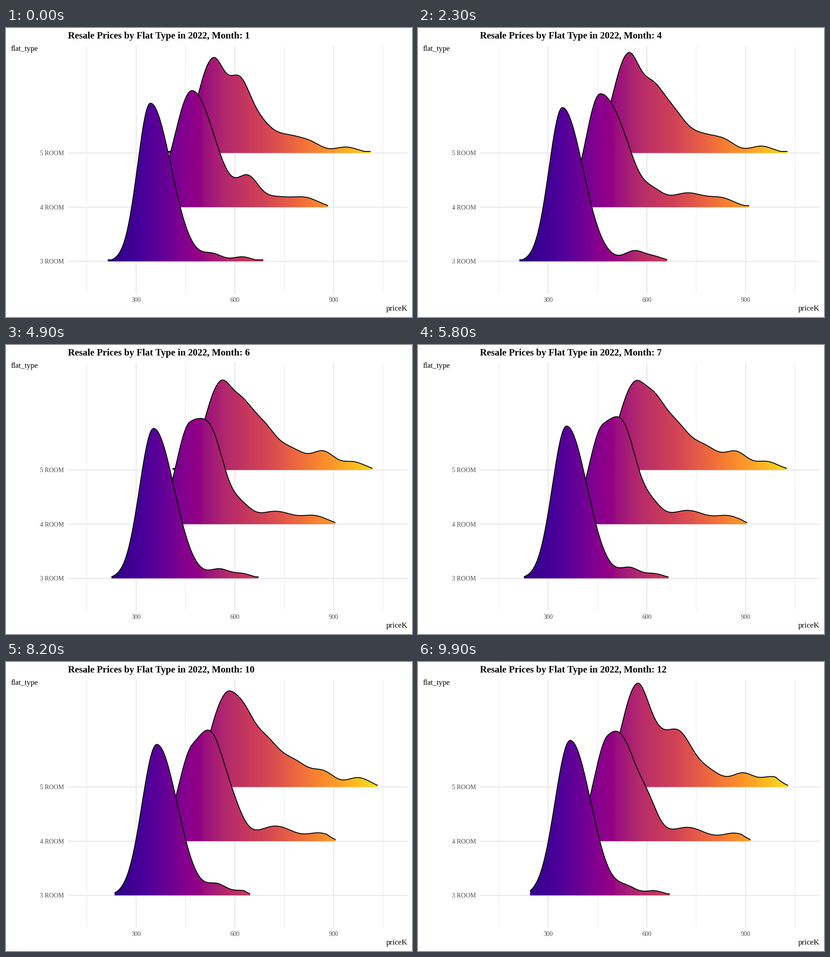
Recreate the animation shown at these times as a matplotlib script. Size 885 px wide and 632 px high, loop 10 s.

```python
import numpy as np
import matplotlib.pyplot as plt
from matplotlib.animation import FuncAnimation
from matplotlib.colors import LinearSegmentedColormap
from matplotlib.path import Path

W, H, DPI = 885, 632, 100
FRAMES, INTERVAL = 100, 100
LEFT, RIGHT, TOP, BOTTOM = 135, 875.5, 38.5, 581
CUT = 3.5                        # ridges end at this height
SHIFT = 0.8

plt.rcParams["font.family"] = "Liberation Serif"


def at(v, f):
    """Value at frame f; a tuple is spread evenly over the year."""
    v = np.atleast_1d(v)
    return np.interp(f, np.linspace(0, FRAMES - 1, len(v)), v)


def bump(x, center, height, left, right):
    d = x - center
    return height * np.exp(-0.5 * (d / np.where(d < 0, left, right)) ** 2)


class Ridge:
    """A density made of bumps: (center, height, left width, right width)."""

    def __init__(self, name, base, start, end, bumps):
        self.name, self.base = name, base
        self.start, self.end, self.bumps = start, end, bumps

    def curve(self, f):
        lo, hi = at(self.start, f), at(self.end, f)
        x = np.linspace(lo, hi, 500)
        h = sum(bump(x, *(at(v, f) for v in b)) for b in self.bumps)
        d = hi - x
        h = np.clip(h, CUT, CUT + 0.4 * d + 0.01 * d ** 2)
        return x + SHIFT, self.base - h


RIDGES = [
    Ridge("3 ROOM", 510.4,
          (221, 214, 229.5, 229, 231, 236, 243.5),
          (560, 545, 538, 550, 541, 531, 548),
          [((314, 312, 317, 321, 325, 328, 331),
            (346, 343, 326, 328, 338, 330, 339), (28, 33), 44.5),
           ((450, 470, 472, 465, 458, 460, 455), (15, 23, 21, 19, 24, 22, 16), 21, 21),
           (514, 10, 20, 20)]),
    Ridge("4 ROOM", 391.9,
          320,
          (701, 722, 720, 717, 716, 718, 724),
          [((404.5, 391, 403, 400, 403, 405, 412),
            (255, 257, 229, 215, 200, 195, 215),
            (38, 28.5, 34, 30, 30, 30, 30), 49),
           (453, (0, 22, 34, 80, 102, 103, 60), 25, 25),
           ((527, 515, 507, 512, 505, 495, 500), (53, 12, 42, 28, 33, 45, 55), 22, 22),
           (587, (22, 31, 31, 28, 32, 33, 30), 38, 38),
           ((655, 690), 17, 27, 27)]),
    Ridge("5 ROOM", 273.4,
          (352, 364, 374, 362, 382, 388, 395),
          (794, 804.5, 804.5, 798, 808, 809.5, 806),
          [((450, 452, 465, 466, 472, 476, 476),
            (204, 207, 224, 185, 178, 189, 220), 33, 28),
           ((507, 521), (112, 105, 55, 80, 92, 88, 40), 22, 22),
           ((545, 565), (70, 88, 92, 95, 96, 98, 115), 30, 30),
           ((615, 630), (34, 38, 32, 42, 54, 52, 34), 31, 31),
           ((665, 665, 675, 692, 694, 692, 708), (17, 14, 33, 38, 36, 30, 29), 24, 24),
           ((740, 772), (13, 22), 25, 25)]),
]

STOPS = [(212, (40, 0, 128)), (283, (66, 0, 150)), (310, (80, 0, 154)),
         (350, (104, 0, 150)), (390, (133, 0, 142)), (424, (148, 0, 131)),
         (432, (153, 15, 126)), (480, (179, 41, 108)), (520, (197, 54, 95)),
         (560, (209, 66, 87)), (600, (225, 86, 74)), (640, (239, 107, 60)),
         (680, (249, 132, 48)), (720, (253, 157, 40)), (760, (253, 187, 32)),
         (812, (247, 225, 28))]
X0, X1 = STOPS[0][0], STOPS[-1][0]
cmap = LinearSegmentedColormap.from_list(
    "heat", [((x - X0) / (X1 - X0), np.array(c) / 255) for x, c in STOPS], N=600)


def px(n):
    return n * 72 / DPI


fig = plt.figure(figsize=(W / DPI, H / DPI), dpi=DPI, facecolor="white")
ax = fig.add_axes([0, 0, 1, 1])
ax.axis("off")


def label(x, y, s, size, **kw):
    return ax.text(x, y, s, fontsize=px(size), va="baseline", **kw)


def grid_line(x, y, width, color):
    ax.plot(x, y, color=color, lw=px(width), zorder=0, snap=False,
            solid_capstyle="butt")


for k in range(7):
    x = 176.1 + 107.6 * k
    major = k % 2 == 1
    if k < 7 and x < RIGHT:
        grid_line([x, x], [TOP, BOTTOM], *((2, "#e6e6e6") if major else (1.1, "#ebebeb")))
    if major:
        label(x, 599, str(150 + 150 * k), 14, ha="center", color="#4d4d4d")
for r in RIDGES:
    grid_line([LEFT, RIGHT], [r.base, r.base], 2, "#e6e6e6")
    label(126.5, r.base + 4.8, r.name, 13.9, ha="right", color="#4d4d4d")

title = label(135, 23.5, "", 20.75, weight="bold")
label(10, 50, "flat_type", 16.6)
label(875.5, 618.5, "priceK", 17.1, ha="right")

ramp = cmap(np.linspace(0, 1, 600))[None, :, :3]
fills, lines = [], []
for k in range(len(RIDGES)):
    z = 10 - 2 * k
    fills.append(ax.imshow(ramp, extent=(X0, X1, H, 0), aspect="auto",
                           interpolation="nearest", zorder=z))
    lines.append(ax.plot([], [], color="black", lw=px(1.9), zorder=z + 1,
                         solid_capstyle="butt", solid_joinstyle="round")[0])
ax.set_xlim(0, W)
ax.set_ylim(H, 0)


def draw(f):
    title.set_text(f"Resale Prices by Flat Type in 2022, Month: {round(1 + f / 9)}")
    for r, fill, line in zip(RIDGES, fills, lines):
        x, y = r.curve(f)
        line.set_data(x, y)
        outline = np.column_stack([np.r_[x[0], x, x[-1], x[0]],
                                   np.r_[r.base, y, r.base, r.base]])
        fill.set_clip_path(Path(outline), ax.transData)
    return [title, *fills, *lines]


anim = FuncAnimation(fig, draw, frames=FRAMES, interval=INTERVAL,
                     repeat=True, repeat_delay=0, blit=False)
plt.show()
```
